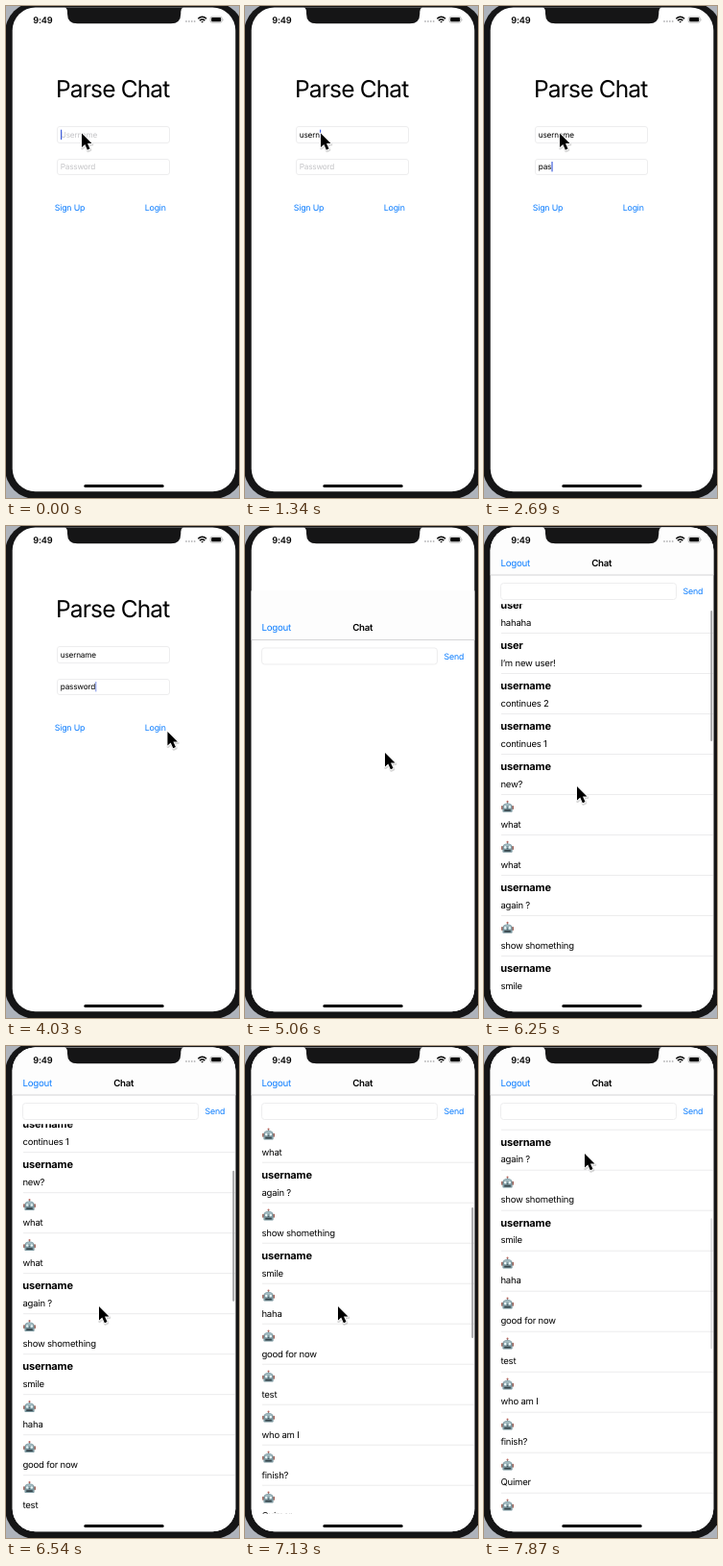
These frames come from a looping animation (243 px wide and 512 px high, 8000 ms). An HTML page:

```html
<!DOCTYPE html>
<html lang="en">
<head>
<meta charset="utf-8">
<title>Chat login</title>
<style>
  html, body { margin: 0; width: 100%; height: 100%; overflow: hidden; background: #aeb3bb; }
  svg { display: block; width: 243px; height: 512px; }
  text { font-family: Inter, "Open Sans", sans-serif; white-space: pre; text-rendering: geometricPrecision; }
  .title { font-size: 24.5px; letter-spacing: -.85px; }
  .input { font-size: 8.2px; letter-spacing: -.2px; }
  .hint { fill: #c4c4c7; }
  .link { font-size: 8.8px; letter-spacing: -.2px; fill: #0a7cff; }
  .nav { font-size: 9.7px; letter-spacing: -.24px; }
  .blue { fill: #0a7cff; }
  .semi { font-weight: 600; }
  .name { font-size: 11px; letter-spacing: -.16px; font-weight: 700; }
  .msg { font-size: 9.5px; letter-spacing: -.19px; }
  .time { font-size: 9.2px; letter-spacing: -.1px; font-weight: 600; }
  .field { fill: #fff; stroke: #ededee; stroke-width: 1; }
  .line { stroke: #e6e6e7; stroke-width: .8; }
</style>
</head>
<body>
<svg viewBox="0 0 243 512">
  <defs>
    <clipPath id="screen"><rect x="6.7" y="1.5" width="232.6" height="503.8" rx="24"/></clipPath>
    <clipPath id="table"><rect x="7" y="81.3" width="232" height="405.5"/></clipPath>
    <g id="bot">
      <rect x="5.9" y="1" width="1.2" height="3" fill="#7b8a90"/>
      <circle cx="6.5" cy="1" r="1" fill="#b5645c"/>
      <rect x="0" y="5.2" width="2" height="4" rx=".8" fill="#a5695f"/>
      <rect x="11" y="5.2" width="2" height="4" rx=".8" fill="#a5695f"/>
      <path d="M1.4 11.2V7Q1.4 2.6 6.5 2.6T11.6 7V11.2Q11.6 12 10.8 12H2.2Q1.4 12 1.4 11.2Z" fill="#7b979f"/>
      <path d="M2.2 5.2Q3.4 3.1 6.5 3.1T10.8 5.2Z" fill="#a4bcc2"/>
      <circle cx="4.2" cy="6.6" r="1.3" fill="#e9f6f8"/>
      <circle cx="8.8" cy="6.6" r="1.3" fill="#e9f6f8"/>
      <path d="M6.5 6.9L7.3 8.4H5.7Z" fill="#4a565b"/>
      <rect x="3.2" y="9.2" width="6.6" height="1.8" rx=".5" fill="#38464c"/>
    </g>
  </defs>

  <rect x="-1" y="-4" width="249" height="517" rx="32" fill="#151516"/>
  <g clip-path="url(#screen)">
    <rect width="243" height="512" fill="#fff"/>

    <text class="title" x="52" y="95">Parse Chat</text>
    <rect class="field" x="53.5" y="125.5" width="117" height="17" rx="2.5"/>
    <rect class="field" x="53.5" y="159.5" width="117" height="16" rx="2.5"/>
    <text class="input" id="user" x="56.8" y="136.7"></text>
    <text class="input" id="pass" x="56.8" y="170"></text>
    <rect id="caret" width="1.2" height="10.4" fill="#4361dc"/>
    <text class="link" x="50.8" y="213">Sign Up</text>
    <text class="link" x="144.8" y="213">Login</text>

    <g id="chat">
      <rect width="243" height="512" fill="#fff"/>
      <rect width="243" height="51" fill="#fdfdfd"/>
      <path d="M0 51H243" stroke="#d4d4d6"/>
      <text class="nav blue" x="17.4" y="42">Logout</text>
      <text class="nav semi" x="112.2" y="42">Chat</text>
      <rect class="field" x="17.5" y="59.5" width="183" height="17" rx="3"/>
      <text class="link" x="207.6" y="71.2">Send</text>
      <g clip-path="url(#table)"><g id="rows"></g></g>
      <rect id="bar" x="236.3" width="1.9" height="136" rx=".95" fill="#a3a3a5"/>
    </g>

    <path d="M58 0Q64 1 64 6V8Q64 18.3 74.5 18.3H172Q182.3 18.3 182.3 8V6Q182.3 1 188 0Z" fill="#151516"/>
    <text class="time" x="28.2" y="17.6">9:49</text>
    <g fill="#b9b9bb" id="dots"></g>
    <g fill="none" stroke="#000" stroke-width="1.5">
      <path d="M200.3 13.2Q204.7 9.2 209.1 13.2M202 15.1Q204.7 12.8 207.4 15.1"/>
      <path d="M203.4 15.9H206L204.7 17.4Z" fill="#000" stroke="none"/>
    </g>
    <rect x="213.2" y="11.2" width="12" height="6" rx="1.7" fill="none" stroke="#999" stroke-width=".7"/>
    <rect x="214.2" y="12.1" width="10" height="4.2" rx="1" fill="#000"/>
    <path d="M226 13.2Q227.2 14.2 226 15.2Z" fill="#999"/>
    <rect x="81.3" y="498" width="83.4" height="3" rx="1.5" fill="#000"/>
  </g>

  <g id="mouse">
    <path d="M0 0V14.6L3.3 11.5L5.9 17.3L8.5 16.1L6 10.5H10.5Z" transform="translate(.5 1.2)"
      fill="none" stroke="#000" stroke-opacity=".16" stroke-width="2.6" stroke-linejoin="round"/>
    <path d="M0 0V14.6L3.3 11.5L5.9 17.3L8.5 16.1L6 10.5H10.5Z" fill="#000" stroke="#fff"
      stroke-width="1.8" stroke-linejoin="round" paint-order="stroke"/>
  </g>
</svg>

<script>
const LOOP = 8000, STEP = 148.4, ROW = 42;
const $ = id => document.getElementById(id);

function add(parent, tag, attrs, text = "") {
  const node = document.createElementNS("http://www.w3.org/2000/svg", tag);
  for (const key in attrs) node.setAttribute(key, attrs[key]);
  node.textContent = text;
  parent.append(node);
}

// "*" marks a message written by the robot
const messages = [
  ["user", "hahaha"], ["user", "I’m new user!"], ["username", "continues 2"],
  ["username", "continues 1"], ["username", "new?"], ["*", "what"], ["*", "what"],
  ["username", "again ?"], ["*", "show shomething"], ["username", "smile"],
  ["*", "haha"], ["*", "good for now"], ["*", "test"], ["*", "who am I"],
  ["*", "finish?"], ["*", "Quimer"], ["*", "hello"]
];
messages.forEach(([name, message], i) => {
  const y = i * ROW, rows = $("rows");
  if (name === "*") add(rows, "use", { href: "#bot", x: 18, y: y + 87.8 });
  else add(rows, "text", { class: "name", x: 17.2, y: y + 98 }, name);
  add(rows, "text", { class: "msg", x: 17.4, y: y + 115.8 }, message);
  add(rows, "path", { class: "line", d: `M18 ${y + 123.5}H240` });
});
for (let i = 0; i < 4; i++) add($("dots"), "circle", { cx: 188 + i * 2.9, cy: 16, r: .9 });

// [time, letters typed]
const userKeys = [[600, 1], [900, 3], [1050, 4], [1340, 5], [1490, 6], [1640, 8]];
const passKeys = Array.from({ length: 8 }, (_, i) => [2390 + i * STEP, i + 1]);
const focusPass = 2080;

const mouseKeys = [
  [3562, 79, 132.5], [3710, 88, 141], [3858, 125, 182], [4007, 168.5, 214],
  [4155, 166, 214], [4452, 158, 212], [4600, 156, 219], [4749, 154, 241],
  [5046, 146, 236], [5492, 142, 231], [5560, 142, 231], [5936, 97, 271],
  [7200, 97, 271], [7865, 105, 112]
];
const dragKeys = [[6085, 0], [6233, 12], [6381, 76], [6530, 139]];

const clamp = v => Math.min(1, Math.max(0, v));

function mix(keys, t) {
  const next = keys.findIndex(k => k[0] > t);
  if (next < 0) return keys[keys.length - 1].slice(1);
  if (next === 0) return keys[0].slice(1);
  const a = keys[next - 1], b = keys[next], p = (t - a[0]) / (b[0] - a[0]);
  return a.slice(1).map((v, i) => v + (b[i + 1] - v) * p);
}

function typed(keys, t) {
  return keys.reduce((n, [at, count]) => t >= at - 20 ? count : n, 0);
}

function fill(node, word, count, hint) {
  const text = count ? word.slice(0, count) : hint;
  if (node.textContent !== text) node.textContent = text;
  node.classList.toggle("hint", !count);
  return count ? node.getComputedTextLength() : 0;
}

function scrollAt(t) {
  return t < 6530 ? mix(dragKeys, t)[0] : 296.4 - 157.4 * Math.exp((6530 - t) / 450);
}

function draw(now) {
  const t = Math.floor((now % LOOP) / STEP) * STEP;

  const userEnd = fill($("user"), "username", typed(userKeys, t), "Username");
  const passEnd = fill($("pass"), "password", typed(passKeys, t), "Password");
  const inPass = t >= focusPass - 20;
  $("caret").setAttribute("x", 57 + (inPass ? passEnd : userEnd));
  $("caret").setAttribute("y", inPass ? 162 : 128.7);
  $("caret").setAttribute("opacity", t > 4000 ? .6 : 1);

  const rise = 1 - (1 - clamp((t - 4800) / 500)) ** 3;
  $("chat").setAttribute("transform", `translate(0 ${(1 - rise) * 512})`);

  const offset = scrollAt(t);
  $("rows").setAttribute("transform", `translate(0 ${-offset})`);
  $("rows").setAttribute("visibility", t > 5300 ? "visible" : "hidden");
  $("bar").setAttribute("y", 84 + offset * .33);
  $("bar").setAttribute("opacity", t < 6200 ? 0 : 1 - .65 * clamp((t - 7700) / 165));

  $("mouse").setAttribute("transform", `translate(${mix(mouseKeys, t)})`);
}

function tick() {
  draw(performance.now());
  requestAnimationFrame(tick);
}
tick();
</script>
</body>
</html>
```
